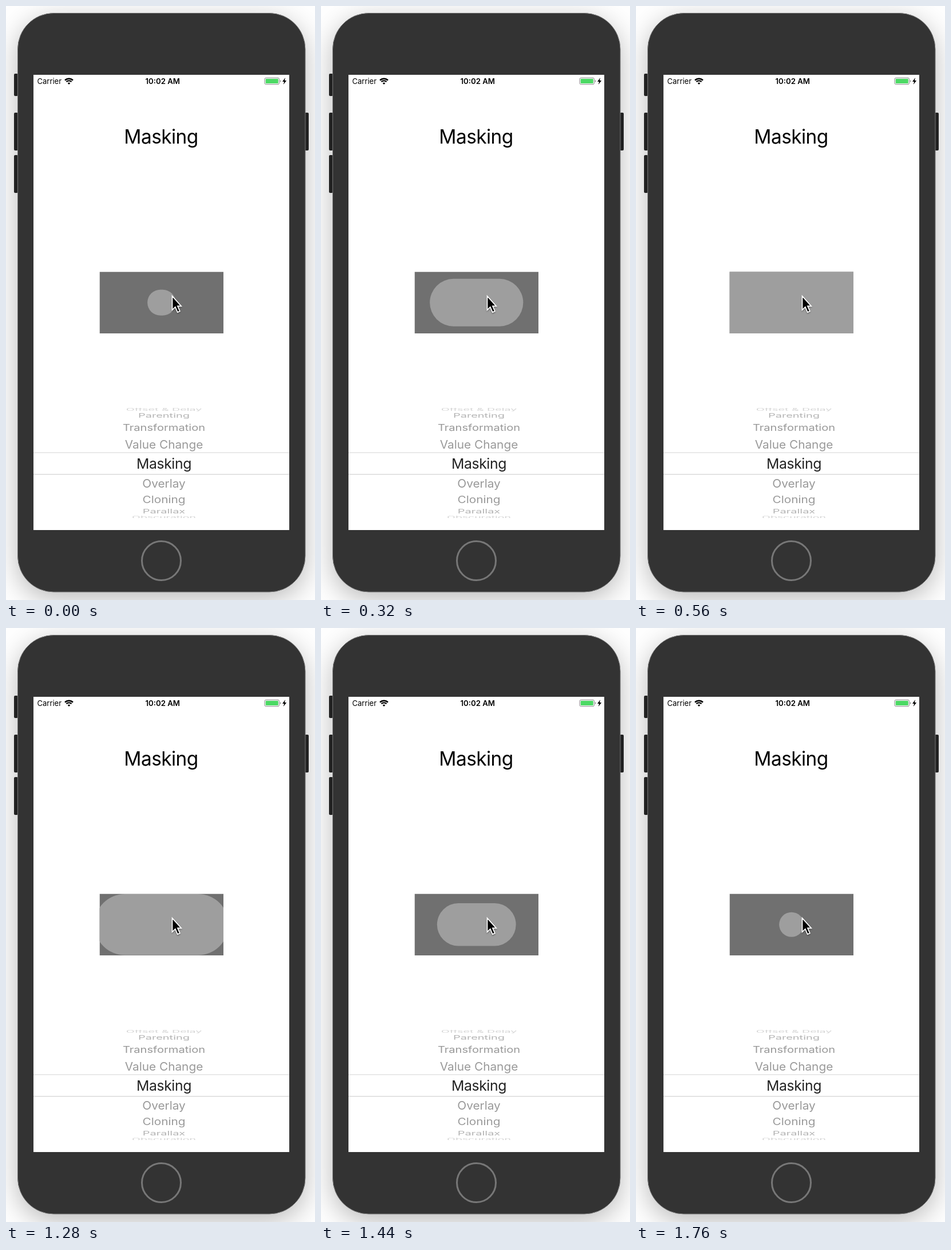
Write an HTML page that moves like this. It is 540x1036 px and loops after 1.84 s.

```html
<!DOCTYPE html>
<html lang="en">
<head>
<meta charset="utf-8">
<title>Masking</title>
<style>
  html, body { margin: 0; height: 100%; overflow: hidden; background: #fff; }
  #stage { display: block; width: 540px; height: 1036px; font-family: Inter, "Liberation Sans", sans-serif; }
  .middle { text-anchor: middle; }
</style>
</head>
<body>
<svg id="stage" viewBox="0 0 540 1036">
  <defs>
    <filter id="glow" filterUnits="userSpaceOnUse" x="-80" y="-80" width="700" height="1200">
      <feDropShadow dx="0" dy="12" stdDeviation="24" flood-opacity=".28"/>
    </filter>
    <filter id="soft" x="-50%" y="-50%" width="200%" height="200%">
      <feDropShadow dx="0" dy="1.5" stdDeviation="1.2" flood-opacity=".4"/>
    </filter>
    <clipPath id="wheel"><rect x="48" y="701" width="447" height="192"/></clipPath>
  </defs>

  <!-- Phone -->
  <rect x="20.5" y="12.5" width="502.5" height="1009.5" rx="63" fill="#333" filter="url(#glow)"/>
  <g fill="#222">
    <rect x="14" y="118" width="7" height="39" rx="2"/>
    <rect x="14" y="186" width="7" height="66" rx="2"/>
    <rect x="14" y="260" width="7" height="66" rx="2"/>
    <rect x="522" y="186" width="7" height="66" rx="2"/>
  </g>
  <rect x="20.5" y="12.5" width="502.5" height="1009.5" rx="63" fill="#333" stroke="#777"/>
  <circle cx="271.5" cy="967.5" r="34" fill="none" stroke="#777" stroke-width="3"/>
  <rect x="48" y="120" width="447" height="794" fill="#fff"/>

  <!-- Status bar -->
  <text x="54.5" y="136" font-size="13">Carrier</text>
  <g fill="none" stroke="#000" stroke-width="2.3">
    <path d="M103 129.6a10 10 0 0 1 14 0M105.5 132.2a6.5 6.5 0 0 1 9 0"/>
    <path d="M110 137l-2.3-2.4a3.4 3.4 0 0 1 4.6 0z" fill="#000" stroke="none"/>
  </g>
  <text class="middle" x="273.7" y="136" font-size="13.2" font-weight="600">10:02 AM</text>
  <rect x="452" y="125.3" width="25.5" height="11.4" rx="2.5" fill="#fff" stroke="#888"/>
  <rect x="453.7" y="127" width="22.1" height="8" rx="1" fill="#4cd964"/>
  <path d="M479 129v4q1.5-.5 1.5-2t-1.5-2z" fill="#888"/>
  <path d="M488 125l-5 7h3l-1.2 5 5.4-7h-3.2z"/>

  <text class="middle" x="271" y="240" font-size="33.4" letter-spacing="-.55">Masking</text>

  <!-- Masked panel -->
  <svg x="163.5" y="463.5" width="216.5" height="107.5">
    <rect width="217" height="108" fill="#707070"/>
    <rect id="mask" fill="#9e9e9e"/>
  </svg>

  <!-- Picker -->
  <path d="M48 779h447M48 816.8h447" stroke="#d3d3d3" stroke-width="1.2"/>
  <g id="picker" class="middle" clip-path="url(#wheel)"></g>

  <path d="M290.5 506v24l5.3-5 4 9 4-1.8-3.9-8.8h6.3z" stroke="#fff" stroke-width="1.7" filter="url(#soft)"/>
</svg>
<script>
const LOOP = 1840, STEP = 80;
const mask = document.getElementById('mask');

// label, baseline, font size, vertical squash, colour
const rows = [
  ['Offset & Delay', 705.5, 19.7, .3, '#d4d4d4'],
  ['Parenting', 717.5, 20, .54, '#b4b4b4'],
  ['Transformation', 741, 20.1, .82, '#999'],
  ['Value Change', 771.5, 20.8, .96, '#999'],
  ['Masking', 807, 24.8, 1, '#222'],
  ['Overlay', 839.5, 20.8, .96, '#999'],
  ['Cloning', 866.5, 20.8, .82, '#999'],
  ['Parallax', 885, 20, .54, '#b4b4b4'],
  ['Obscuration', 893.5, 19.4, .3, '#d4d4d4'],
];
for (const [label, y, size, squash, colour] of rows) {
  const text = document.createElementNS('http://www.w3.org/2000/svg', 'text');
  text.textContent = label;
  text.setAttribute('transform', `translate(276 ${y}) scale(1 ${squash})`);
  text.setAttribute('font-size', size);
  text.setAttribute('fill', colour);
  if (squash === 1) text.setAttribute('letter-spacing', -.4);
  document.getElementById('picker').append(text);
}

// Extra height of the pill: accelerates open, then eases shut
const growth = t => t < 900
  ? (.0153 * (t + 92)) ** 2
  : 67.5 * (1 - Math.cos(Math.PI * (1760 - t) / 1000));

function draw(now) {
  const t = Math.floor(now % LOOP / STEP) * STEP;
  const extra = growth(t), h = 43.2 + extra, w = 43.2 + 3.02 * extra;
  const box = { x: 108.25 - w / 2, y: 53.75 - h / 2, width: w, height: h, rx: h / 2 };
  for (const key in box) mask.setAttribute(key, box[key]);
}

const start = performance.now();
function tick() {
  draw(performance.now() - start);
  requestAnimationFrame(tick);
}
tick();
</script>
</body>
</html>
```
